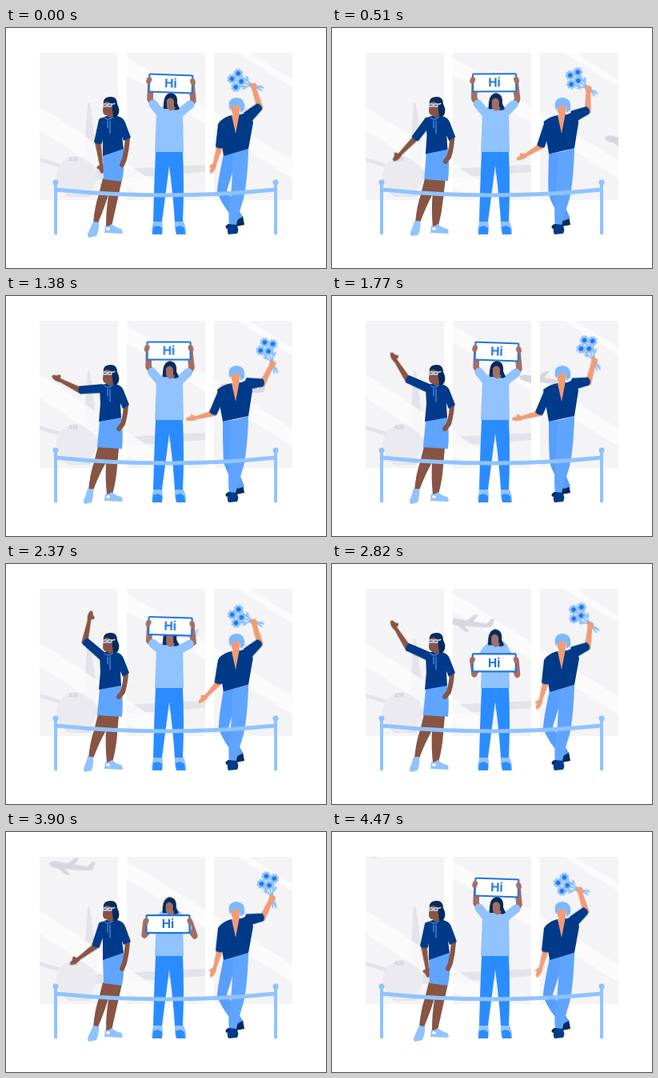
An HTML page that plays this animation: 400x300 px, repeating every 4.5 s.

```html
<!DOCTYPE html>
<html lang="en">
<head>
<meta charset="utf-8">
<title>Welcome at the gate</title>
<style>
html, body { margin: 0; width: 100%; height: 100%; overflow: hidden; background: #fff; }
svg { display: block; width: 100vw; height: 100vh; }

:root {
  --navy: #003a88; --ink: #062a5c; --blue: #2b8cff; --mid: #5fa5ff; --pale: #90c3ff;
  --deep: #1f76dc; --brown: #885444; --tan: #a56e63; --peach: #f09c76;
}
.navy { fill: var(--navy); } .ink { fill: var(--ink); } .blue { fill: var(--blue); }
.mid { fill: var(--mid); } .pale { fill: var(--pale); }
.brown { fill: var(--brown); } .tan { fill: var(--tan); } .peach { fill: var(--peach); }
.line { fill: none; stroke-linecap: round; stroke-linejoin: round; }

.a { animation: 4.5s ease-in-out infinite; }
.jet { animation: jet 4.5s linear infinite; }
@keyframes jet { from { transform: translate(411px, 156px); } to { transform: translate(30px, 26px); } }

/* woman */
.w-pose { animation-name: w-pose; }
@keyframes w-pose { 0%, 86%, 100% { d: var(--a); } 16%, 76% { d: var(--b); } }
.w-up { animation-name: w-up; }
@keyframes w-up {
  0%, 95%, 100% { transform: rotate(12deg); }
  21% { transform: rotate(55deg); }
  40%, 63% { transform: rotate(113deg); }
  53%, 73% { transform: rotate(130deg); }
  86.7% { transform: rotate(18deg); }
}
.w-fore { animation-name: w-fore; }
@keyframes w-fore {
  0%, 95%, 100% { transform: rotate(-20deg); }
  21% { transform: rotate(29deg); }
  40%, 63% { transform: rotate(35deg); }
  53%, 73% { transform: rotate(62deg); }
  86.7% { transform: rotate(36deg); }
}

/* sign holder: u = up, l = up and left, m = chest, d = down */
.arm { animation-name: arm; }
@keyframes arm {
  0%, 40%, 98%, 100% { d: var(--u); }
  21% { d: var(--l); }
  48.5% { d: var(--u); animation-timing-function: ease-in; }
  60% { d: var(--m); animation-timing-function: ease-out; }
  68% { d: var(--d); }
  77% { d: var(--d); animation-timing-function: ease-in; }
  86.7% { d: var(--m); animation-timing-function: ease-out; }
}
.sign { animation-name: sign; }
@keyframes sign {
  0%, 40%, 98%, 100% { transform: translate(206px, 69.5px) rotate(2deg); }
  21% { transform: translate(201px, 67.5px) rotate(-2deg); }
  48.5% { transform: translate(206px, 69.5px) rotate(2deg); animation-timing-function: ease-in; }
  60% { transform: translate(202.5px, 115px); animation-timing-function: ease-out; }
  68% { transform: translate(203px, 132px); }
  77% { transform: translate(203px, 132px); animation-timing-function: ease-in; }
  86.7% { transform: translate(202.5px, 115px); animation-timing-function: ease-out; }
}
.sway { animation-name: sway; }
@keyframes sway {
  0%, 40%, 100% { transform: none; }
  21%, 68%, 77% { transform: translate(-2px, .5px); }
}

/* man with flowers */
.m-pose { animation-name: m-pose; }
@keyframes m-pose { 0%, 58%, 100% { d: var(--a); } 16%, 42% { d: var(--b); } }
.m-up { animation-name: m-up; }
@keyframes m-up {
  0%, 62%, 100% { transform: rotate(6deg); }
  18%, 40% { transform: rotate(23deg); }
  53% { transform: rotate(9deg); }
}
.m-fore { animation-name: m-fore; }
@keyframes m-fore {
  0%, 62%, 100% { transform: rotate(11deg); }
  18%, 40% { transform: rotate(53deg); }
  53% { transform: rotate(34deg); }
}
.f-up { animation-name: f-up; }
@keyframes f-up {
  0%, 51%, 100% { transform: rotate(50deg); }
  21%, 39.3%, 73%, 86.7% { transform: rotate(82deg); }
  30%, 80% { transform: rotate(88deg); }
}
.f-fore { animation-name: f-fore; }
@keyframes f-fore {
  0%, 51%, 100% { transform: rotate(-67deg); }
  21%, 39.3% { transform: rotate(-67deg); }
  30% { transform: rotate(-61deg); }
  73%, 86.7% { transform: rotate(-56deg); }
  80% { transform: rotate(-52deg); }
}
.posy { animation-name: posy; }
@keyframes posy {
  0%, 21%, 51%, 73%, 100% { transform: rotate(-53deg); }
  39.3%, 86.7% { transform: rotate(-39deg); }
}
</style>
</head>
<body>
<svg viewBox="0 0 400 300">
  <defs>
    <clipPath id="panes"><path d="M42 31h98v184H42zM151 31h98v184h-98zM260 31h98v184h-98z"/></clipPath>
    <g id="bloom">
      <g class="pale">
        <ellipse rx="6.4" ry="2.6"/>
        <ellipse rx="6.4" ry="2.6" transform="rotate(45)"/>
        <ellipse rx="6.4" ry="2.6" transform="rotate(90)"/>
        <ellipse rx="6.4" ry="2.6" transform="rotate(135)"/>
      </g>
      <circle r="2.8" fill="#1f76dc"/>
    </g>
  </defs>

  <!-- windows -->
  <g clip-path="url(#panes)">
    <path fill="#f4f4f7" d="M42 31h316v184H42z"/>
    <g fill="#e3e4e9">
      <path d="M102 94h3l10 76H97z"/>
      <path d="M42 162l44 13v5L42 167zM110 178l139-7v9l-136 10z"/>
      <path d="M72 205h34v6H78z"/>
      <circle cx="88" cy="185" r="25" fill="#ebebef"/>
    </g>
    <text x="78" y="167" font-family="Inter, sans-serif" font-weight="700" font-size="7" fill="#cfd0d8">AIR</text>
    <path fill="#fff" opacity=".7" d="M42 98L220 215H176L42 127zM151 36L358 166v22L151 58zM290 31h14l54 34v9z"/>
    <g class="jet" fill="#d6d7dd">
      <path d="M-27-4Q-24-8-16-6L21 0 27-6 31-6 28 4 20 5-18 2Q-26 0-27-4z"/>
      <path d="M-4-4L6-11h5L4-2zM-8 2L0 10h-6L-16 2z"/>
    </g>
  </g>

  <!-- woman -->
  <g>
    <g transform="translate(121 115)"><g class="a w-up">
      <g transform="translate(0 29)"><g class="a w-fore brown">
        <path d="M-4-3Q0-6 4-3L2.5 26Q4 30 3 35L1 39-2 38-3 34-6 31-5 29-2 28z"/>
      </g></g>
      <path class="navy" d="M-5 0Q0-6 6 0L5 29Q0 32-5 29z"/>
    </g></g>
    <path class="a w-pose brown" style="--a:path('M121 188L134 189L128 208Q124 222 115 244L109 244Q111 222 116 208Z');--b:path('M115 188L129 189L125 208Q116 224 109 243L103 243Q105 222 110 208Z')"/>
    <path class="a w-pose brown" style="--a:path('M131 190L145 190L140 212Q136 230 132 248L125 248Q125 228 128 210Z');--b:path('M126 190L141 190L139 212Q138 230 133 248L126 248Q124 228 125 210Z')"/>
    <path class="a w-pose pale" style="--a:path('M109 242L116 243Q117 252 113 260L104 262Q100 260 104 253Z');--b:path('M102 241L109 241Q110 250 107 258L99 260Q95 258 99 251Z')"/>
    <path class="pale" d="M124 247Q128 249 132 245Q138 250 144 251Q147 255 145 257L123 256z"/>
    <path fill="#fff" d="M126 249l4 1-1 3-4-1z"/>
    <path class="a w-pose mid" style="--a:path('M121 158L147 150Q149 170 145 192L122 189Z');--b:path('M117 156L144 151Q147 172 145 191L114 189Z')"/>
    <path class="a w-pose line" stroke="#885444" stroke-width="6" style="--a:path('M152 138Q151 152 148 164L145 171');--b:path('M150 137Q149 150 146 160L141 166')"/>
    <path class="a w-pose navy" style="--a:path('M118 114Q124 110 129 109L139 110Q147 112 149 118L156 137L147 141L145 136L147 151L121 160L121 135Z');--b:path('M117 113Q123 110 126 109L137 110Q145 112 147 118L154 136L146 141L143 134L144 152L116 157L118 135Z')"/>
    <path class="line" stroke="#5fa5ff" stroke-width="1" d="M123 112Q128 117 134 111M127 116v9M130 116v16"/>
    <path class="ink" d="M122 97Q120 86 131 86Q139 86 139 95Q144 104 139 110Q134 113 130 109z"/>
    <path class="brown" d="M122 94Q127 89 132 95L134 110Q129 115 126 109Q121 109 121 103z"/>
    <path class="line" stroke="#b9dbff" stroke-width="1.3" d="M121.500 95h4.500v3h-4.500zM127.500 95h4.500v3h-4.500zM132 95.500l4-1"/>
  </g>

  <!-- sign holder -->
  <g>
    <path class="pale" d="M185 240h10q2 12 0 18h-12q-2-6 2-18zM211 240h10q5 10 4 18h-12q-3-7-2-18z"/>
    <path class="blue" d="M184 249q6-4 11 1v8h-12zM212 249q6-4 11 1l1 8h-11z"/>
    <path class="blue" d="M187 154H221Q223 200 221 242H211Q209 210 204 172Q199 212 195 242H184Q185 200 187 154z"/>
    <path class="pale" d="M188 106Q194 97 200 96H211Q219 98 221 106L222 155H186z"/>
    <g class="line" stroke="#a56e63" stroke-width="7.500">
      <path class="a arm" style="--u:path('M184 95L180 89L181 67');--l:path('M181 95L176 88L176 65');--m:path('M182 118L173 129L175 112');--d:path('M186 124L183 147L177 129')"/>
      <path class="a arm" style="--u:path('M230 97L234 91L232 69');--l:path('M226 95L230 88L227 65');--m:path('M228 119L236 130L230 113');--d:path('M224 124L227 147L230 130')"/>
    </g>
    <g class="line" stroke="#90c3ff" stroke-width="11">
      <path class="a arm" style="--u:path('M194 108L184 95');--l:path('M192 107L181 95');--m:path('M193 108L182 119');--d:path('M193 108L187 124')"/>
      <path class="a arm" style="--u:path('M215 108L230 96');--l:path('M215 107L225 95');--m:path('M216 108L227 120');--d:path('M216 108L222 124')"/>
    </g>
    <g class="a sway">
      <path class="ink" d="M197 101Q196 82 206 81Q215 82 214 94L217 101Q212 104 208 101z"/>
      <path class="tan" d="M201 90Q206 84 210 91V98L212 100Q206 107 201 99z"/>
    </g>
    <g class="a sign">
      <rect x="-27" y="-11" width="54" height="22" rx="1" fill="#fff" stroke="#1f76dc" stroke-width="2.200"/>
      <text y="5.300" text-anchor="middle" font-family="Inter, sans-serif" font-weight="700" font-size="15" fill="#1f76dc">Hi</text>
      <path class="tan" d="M-30-6q3-3 6 0v3l-2 4q-4 1-5-2zM30-6q-3-3-6 0v3l2 4q4 1 5-2z"/>
    </g>
  </g>

  <!-- man with flowers -->
  <g>
    <g transform="translate(270 120)"><g class="a m-up">
      <g transform="translate(0 29)"><g class="a m-fore peach">
        <path d="M-4-3Q0-6 4-3L2.500 21Q4 25 2 31L0 35-3 33-3 28-6 27-2 22z"/>
      </g></g>
      <path class="navy" d="M-5 0Q0-7 6 0L5 29Q0 32-5 29z"/>
    </g></g>
    <path class="ink" d="M289 238L296 235L298 246Q286 248 276 251Q272 248 278 245z"/>
    <path class="a m-pose" fill="#569eff" style="--a:path('M272 158L290 155Q282 185 276 203L296 236L287 241Q270 222 264 205Q264 195 272 158Z');--b:path('M271 157L290 154Q290 185 286 208L298 238L290 241Q277 225 272 208Q271 190 271 157Z')"/>
    <path class="a m-pose mid" style="--a:path('M284 156L303 151Q302 190 297 213Q291 232 288 246L279 246Q277 232 281 213Q283 185 284 156Z');--b:path('M282 156L303 150Q302 190 297 213Q291 232 287 246L279 246Q277 232 279 213Q280 185 282 156Z')"/>
    <path class="navy" d="M279 245L288 246Q292 252 289 257L278 258Q275 253 279 245z"/>
    <g transform="translate(304 109)"><g class="a f-up">
      <g transform="translate(0 -17)"><g class="a f-fore">
        <g transform="translate(0 -27)"><g class="a posy">
          <path class="line" stroke="#5fa5ff" stroke-width="1.300" d="M8-23L0 0-1-27M-9-20L0 0 2 13M0 0L-2 12"/>
          <path class="pale" d="M0 4q5 2 3 9-4-2-3-9zM-2-6q-7-1-7-6 6 0 7 6zM2-7q2-6 7-6 0 5-7 6z"/>
          <use href="#bloom" x="8" y="-23"/>
          <use href="#bloom" x="-1" y="-28"/>
          <use href="#bloom" x="-9" y="-20"/>
          <use href="#bloom" x="0" y="-16"/>
        </g></g>
        <path class="peach" d="M-4 3Q0 6 4 3L3-22Q6-26 3-30L-2-31Q-5-28-3-23z"/>
      </g></g>
      <path class="navy" d="M-7 3Q0 8 8 3L5-17Q0-21-5-17z"/>
    </g></g>
    <path class="a m-pose navy" style="--a:path('M267 117Q275 110 282 109L294 108L304 104L309 118L303 151L272 160L268 135Z');--b:path('M264 117Q273 110 282 109L294 108L304 104L308 118L303 150L271 157L267 135Z')"/>
    <path class="peach" d="M282 109L292 106 287 132z"/>
    <ellipse class="peach" cx="287" cy="101" rx="5.500" ry="8.500"/>
    <path fill="#7db8ff" d="M280 103Q275 88 288 87Q300 88 298 102L293 106Q293 99 291 96L283 98z"/>
  </g>

  <!-- barrier -->
  <g fill="none" stroke="#90c3ff">
    <path stroke-width="5" d="M62 202Q200 216 337 202"/>
    <path stroke-width="4" d="M62 193v65M337 193v65"/>
  </g>
  <g class="pale"><circle cx="62" cy="193" r="3.500"/><circle cx="337" cy="193" r="3.500"/></g>
</svg>
</body>
</html>
```
